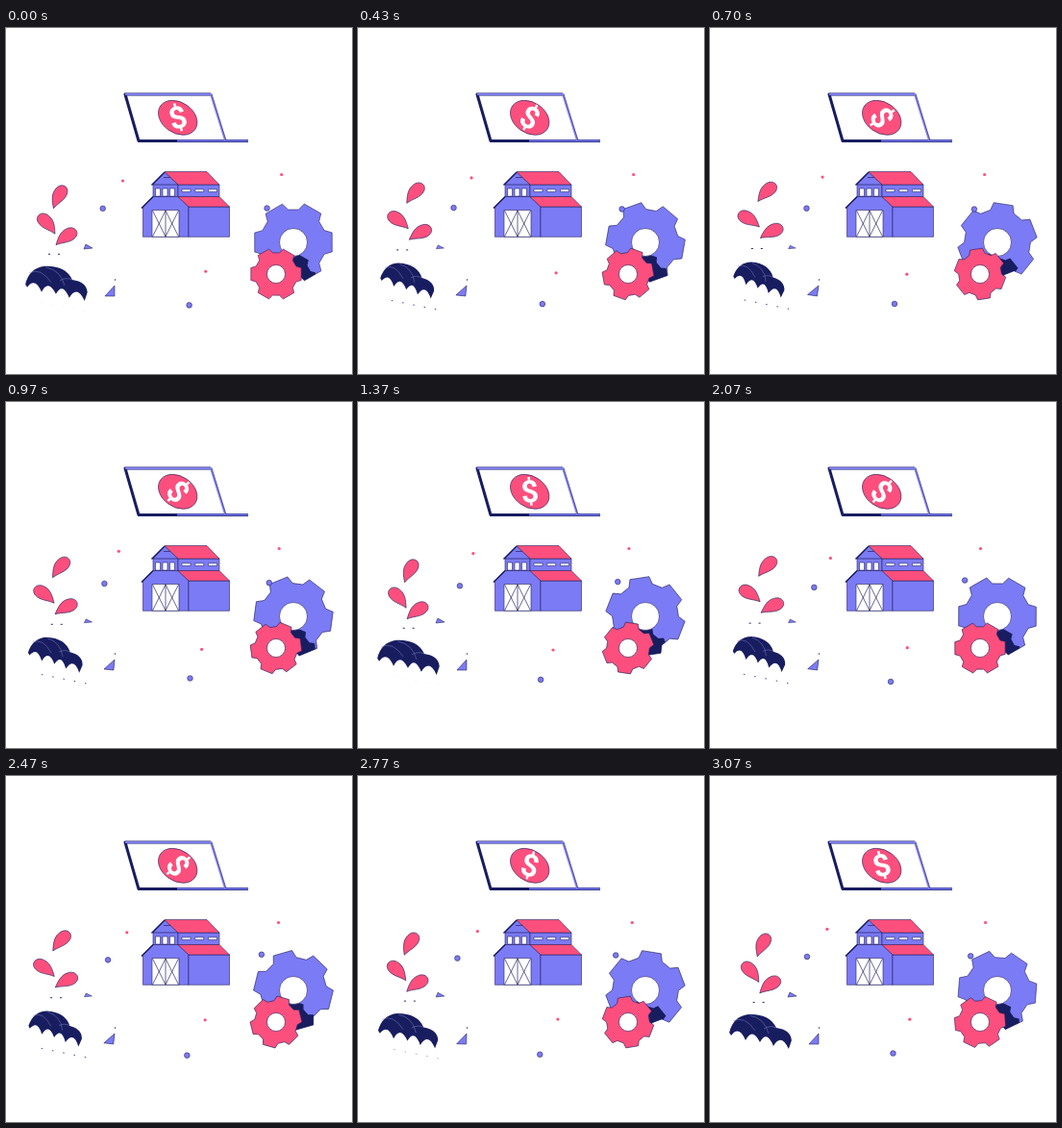
An HTML page for the animation above (3110 ms loop, 360x360 px).

```html
<!DOCTYPE html>
<html lang="en">
<head>
<meta charset="utf-8">
<title>Farm finance</title>
<style>
html, body { margin: 0; width: 100%; height: 100%; overflow: hidden; background: #fff; }
svg { display: block; width: 100vw; height: 100vh; }
.p { fill: #7b7bf5; }
.r { fill: #fc4f7d; }
.n { fill: #181d60; }
.w { fill: #fff; }
.o { stroke: #25235f; stroke-width: .6; stroke-linejoin: round; }
.l { fill: none; stroke: #25235f; stroke-width: .7; }
.dark { fill: none; stroke: #181d60; stroke-width: 3; }
.lit { fill: none; stroke: #7b7bf5; stroke-width: 1.8; }
text { font: bold 32px Roboto, Arial, sans-serif; text-anchor: middle; }
</style>
</head>
<body>
<svg viewBox="0 0 360 360">
  <defs>
    <path id="drop" d="M0 0C-4-6-8-12-6-19C-4-28 6-28 7-20C8-13 2-7 0 0Z"/>
    <clipPath id="bigClip"><path id="clipGear"/></clipPath>
  </defs>

  <!-- laptop -->
  <path class="dark" d="M252 117.5H138L124 69H213" stroke-linejoin="round"/>
  <path class="lit" d="M124 69H213L228 117M178 117.3H252" stroke-linejoin="round"/>
  <path class="l" d="M214 68.5L229 117"/>
  <circle r="18" class="r o" transform="matrix(1.08 0 .31 1 178.7 93.3)"/>
  <text id="coin" class="w" y="11">$</text>

  <!-- barn -->
  <path d="M153 163L165 150L179 163V176H153Z" class="p o"/>
  <path d="M179 163H222V176H179Z" class="p o"/>
  <path d="M165 149.5H209L222 163H179Z" class="r o"/>
  <path d="M141.5 187L153 175.5H179L190 186V217.3H142.5V187Z" class="p o"/>
  <path d="M190 186H232.5V217.3H190Z" class="p o"/>
  <path d="M179 175.5H222L232.5 186H190Z" class="r o"/>
  <path d="M141 187.5L153 175.5M151.5 163.5L165 150" stroke="#181d60" stroke-width="1.5"/>
  <path d="M164 155.5H171M153 163H179" class="l"/>
  <g id="windows"></g>
  <path d="M152 189.5H180V217.3H152Z" class="w o"/>
  <path d="M166 189.5V217.3M152.5 190L166 217L179.5 190M152.5 217L166 190L179.5 217" class="l"/>

  <!-- gears -->
  <path id="big" class="p o"/>
  <g clip-path="url(#bigClip)"><path id="shade" class="n"/></g>
  <circle cx="299" cy="223" r="14.5" class="w o"/>
  <path id="small" class="r o"/>
  <circle cx="281" cy="256" r="9.5" class="w o"/>

  <!-- plant and canopy -->
  <g id="drops"></g>
  <g id="canopy">
    <path class="n" d="M20 267Q24 250 40 248Q62 247 69 262Q84 264 85 275L82 284Q74 267 66 281Q59 264 52 277Q44 261 37 275Q30 259 22 270Z"/>
    <path d="M24 255Q36 249 47 265M41 249Q57 252 61 268M56 263Q63 259 69 262" fill="none" stroke="#8583c4" stroke-width=".5"/>
  </g>
  <path id="drips" d="M34 283L84 293" stroke="#4644a0" stroke-dasharray="1.5 10"/>
  <path id="dash" d="M44 235.5h14" stroke="#25235f" stroke-dasharray="2 8"/>
  <path id="flag" class="p o" d="M83 225L90 229L81 230Z"/>
  <path id="wedge" class="p o" d="M113 268V279H103Z"/>
  <path d="M113.5 261v2" class="l"/>
  <g id="dots"></g>
</svg>
<script>
const LOOP = 3110, TAU = 2 * Math.PI;
const $ = id => document.getElementById(id);
const set = (id, v) => $(id).setAttribute('transform', v);

function add(parent, tag, attrs) {
  const e = document.createElementNS('http://www.w3.org/2000/svg', tag);
  for (const k in attrs) e.setAttribute(k, attrs[k]);
  return $(parent).appendChild(e);
}

for (let i = 0; i < 3; i++) {
  add('windows', 'rect', { x: 155.5 + 7.5 * i, y: 167, width: 5, height: 8, class: 'w o' });
  add('windows', 'rect', { x: 183 + 13.75 * i, y: 167.8, width: 9, height: 2.6, class: 'w o' });
}

// Six broad teeth, with a gap pointing straight up
function gear(r) {
  const pts = [];
  for (let i = 0; i < 6; i++)
    for (const [a, k] of [[-21, .83], [-14, 1], [14, 1], [21, .83]]) {
      const t = (i * 60 + 30 + a) * TAU / 360;
      pts.push((r * k * Math.sin(t)).toFixed(2) + ' ' + (-r * k * Math.cos(t)).toFixed(2));
    }
  return 'M' + pts.join('L') + 'Z';
}
for (const id of ['big', 'clipGear']) $(id).setAttribute('d', gear(41.5));
for (const id of ['small', 'shade']) $(id).setAttribute('d', gear(27));

const drops = [
  { x: 49.5, y: 188, side: 1, lean: 22, swing: 19 },
  { x: 51, y: 214.5, side: -1, lean: 36, swing: 17 },
  { x: 52, y: 226, side: 1, lean: 50, swing: 10 }
].map(d => ({ ...d, el: add('drops', 'use', { href: '#drop', class: 'r o' }) }));

// Each dot glides to and fro on a line: centre, reach, time of the far end
const dots = [
  { x: 121.5, y: 159, dx: 4.5, dy: 4, far: .75 },
  { x: 104, y: 190, dx: 4.5, dy: 3, far: .62 },
  { x: 284, y: 152.5, dx: 3, dy: 0, far: .07 },
  { x: 270, y: 187, dx: 5, dy: 1.5, far: .2 },
  { x: 205.5, y: 255.5, dx: 2.5, dy: -2.5, far: .93 },
  { x: 190, y: 289, dx: 2, dy: -2, far: .2 }
].map((d, i) => ({
  ...d, el: add('dots', 'circle', i % 2 ? { class: 'p o', r: 2.8 } : { class: 'r', r: 1.6 })
}));

const wave = x => (1 - Math.cos(TAU * x)) / 2;

function draw(now) {
  const q = now % LOOP / LOOP, p = 2 * q;
  const u = wave(p), v = wave(p + .06), sway = 1.3 * Math.sin(TAU * p);

  set('coin', `translate(178.7 93.3) rotate(${75 * u - 16})`);

  const turn = 360 * q;
  for (const id of ['big', 'clipGear']) set(id, `translate(299 223) rotate(${-turn})`);
  set('small', `translate(281 256) rotate(${turn})`);
  set('shade', `translate(296 261) rotate(${turn})`);

  for (const { x, y, side, lean, swing, el } of drops)
    el.setAttribute('transform', `translate(${x + sway} ${y - 7.5 * v}) scale(${side} 1) rotate(${lean + swing * v})`);

  set('canopy', `translate(${52 - v} ${266 - 5 * v}) rotate(${8 * v}) scale(${1 - .16 * v} ${1 - .1 * v}) translate(-52 -266)`);
  set('drips', `translate(${2 - sway} ${2 * (1 - v)})`);
  $('drips').setAttribute('opacity', Math.min(1, v * 2));
  set('dash', `translate(${-sway * 3} ${-6 * v})`);
  set('flag', `translate(85 229) scale(${1 - .15 * v} ${1 - .3 * v}) translate(-85 -229)`);
  set('wedge', `rotate(${8 * v} 113 268)`);

  for (const { x, y, dx, dy, far, el } of dots) {
    const c = Math.cos(TAU * (q - far));
    el.setAttribute('cx', x + dx * c);
    el.setAttribute('cy', y + dy * c);
  }
}

const start = performance.now();
function tick() {
  draw(performance.now() - start);
  requestAnimationFrame(tick);
}
tick();
</script>
</body>
</html>
```
